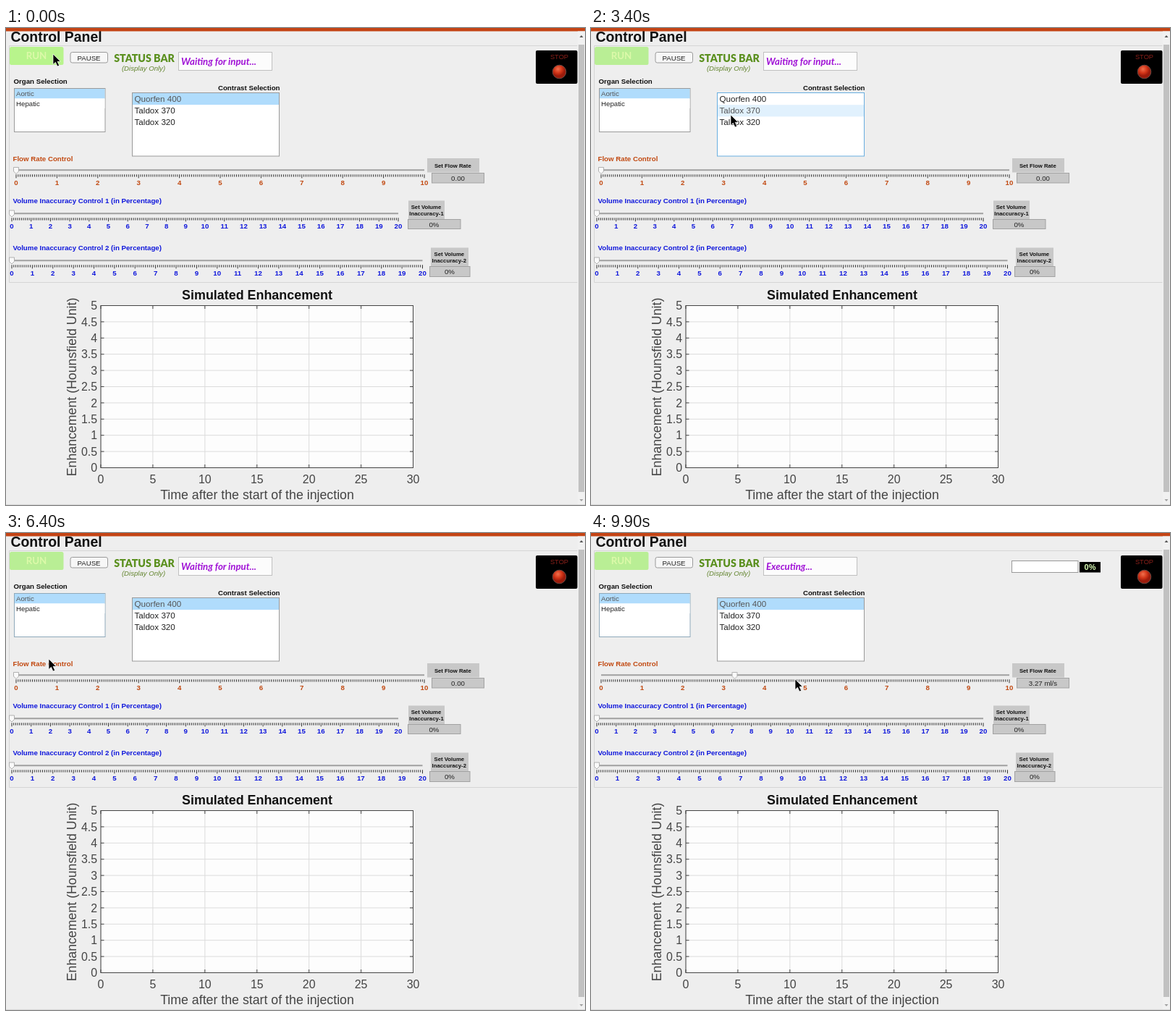
Animation of 800x659 px, one loop 10000 ms. Source, as an HTML page:

```html
<!DOCTYPE html>
<html lang="en">
<head>
<meta charset="utf-8">
<title>Control Panel</title>
<style>
html, body { margin: 0; width: 100%; height: 100%; overflow: hidden; background: #eee; }
svg { display: block; width: 800px; height: 659px; }
text { font: 9.7px "Liberation Sans", Arial, sans-serif; fill: #222; }
.b { font-weight: bold; }
.mid { text-anchor: middle; }
.end { text-anchor: end; }
.hum { font-family: Lato, sans-serif; font-weight: bold; }
.orange { fill: #c24a12; }
.blue { fill: #1018dc; }
.small { font-size: 7.75px; font-weight: bold; fill: #111; }
.row { font-size: 11.65px; }
.axis { font-size: 15.9px; fill: #444; }
.label { font-size: 17.75px; fill: #444; }
.box { fill: #c8c8c8; }
.field { fill: #c8c8c8; stroke: #a2a2a2; }
.list { fill: #fff; stroke: #9a9a9a; }
.thumb { fill: #fafafa; stroke: #a0a0a0; stroke-width: .8; }

.step { animation: 10s step-end infinite; }
#run { animation-name: run; }
#status { animation-name: blink; }
#organs { animation-name: organs; }
#contrasts { animation-name: contrasts; }
#hepatic { animation-name: hepatic; }
#first { animation-name: first; }
#second { animation-name: second; }
#firstText { animation-name: firstText; }
#secondText { animation-name: secondText; }
#hepaticText { animation-name: hepaticText; }
#flow { animation-name: flow; }
.before { animation-name: before; }
.after { animation-name: after; }
.exec { animation-name: exec; }
.wait { animation-name: wait; }
#ghost { animation-name: ghost; }
#cursor { animation: move 10s linear infinite; }

@keyframes run { 0% { fill: #b8f48c; } 4%, 100% { fill: #b9ee95; } }
@keyframes blink {
  0%, 14%, 34%, 54%, 74%, 91% { fill: #fcfcfc; }
  5%, 25%, 45%, 65%, 85% { fill: #a8ffc2; }
}
@keyframes organs { 0% { stroke: #9a9a9a; } 48% { stroke: #68aee0; } 56%, 100% { stroke: #8fa9ba; } }
@keyframes contrasts { 0%, 47%, 100% { stroke: #9a9a9a; } 31% { stroke: #68aee0; } }
@keyframes hepatic { 0%, 55%, 100% { fill: #fff; } 49% { fill: #dff0fd; } }
@keyframes hepaticText { 0%, 55%, 100% { fill: #222; } 49% { fill: #555; } }
@keyframes first { 0%, 43%, 100% { fill: #b0dcfc; } 34% { fill: #fff; } }
@keyframes firstText { 0%, 43%, 100% { fill: #555; } 34% { fill: #222; } }
@keyframes second { 0%, 43%, 100% { fill: #fff; } 33% { fill: #e1f1fd; } 36% { fill: #b0dcfc; } }
@keyframes secondText { 0%, 43%, 100% { fill: #222; } 33% { fill: #555; } }
@keyframes flow { 0% { transform: translate(14px, 196px); } 89%, 100% { transform: translate(198.5px, 196px); } }
@keyframes before { 0% { opacity: 1; } 89%, 100% { opacity: 0; } }
@keyframes after { 0% { opacity: 0; } 89%, 100% { opacity: 1; } }
@keyframes wait { 0% { opacity: 1; } 91%, 100% { opacity: 0; } }
@keyframes exec { 0% { opacity: 0; } 91%, 100% { opacity: 1; } }
@keyframes ghost { 0%, 16%, 100% { opacity: 0; } 15% { opacity: 1; } }
@keyframes move {
  0%, 4% { transform: translate(65px, 36px); }
  13% { transform: translate(70px, 206px); }
  15%, 16% { transform: translate(94px, 238px); }
  20% { transform: translate(120px, 270px); }
  31% { transform: translate(194px, 112px); }
  33.5%, 37% { transform: translate(193px, 120px); }
  41%, 44% { transform: translate(194px, 98px); }
  49% { transform: translate(104px, 103px); }
  51%, 53% { transform: translate(104px, 109px); }
  57% { transform: translate(66px, 164px); }
  64%, 66% { transform: translate(59px, 174px); }
  72% { transform: translate(66px, 196px); }
  83%, 90% { transform: translate(199px, 203px); }
  98%, 100% { transform: translate(282px, 202px); }
}
</style>
</head>
<body>
<svg viewBox="0 0 800 659">
  <defs>
    <radialGradient id="lamp" cx="40%" cy="30%">
      <stop offset="0" stop-color="#f0704e"/>
      <stop offset=".6" stop-color="#d23518"/>
      <stop offset="1" stop-color="#9c1c0c"/>
    </radialGradient>
    <path id="arrow" d="M0 0V14.4L3.4 11.3L6 17L8.6 15.8L6.1 10.3H10.3Z" stroke="#fff" stroke-width=".7"/>
    <path id="knob" d="M-3.5 -3.5H3.5V2L0 5.5L-3.5 2Z"/>
  </defs>

  <rect width="800" height="659" fill="#eee"/>
  <path d="M789.5 24.5H4.5V351.5H789.5" fill="none" stroke="#d5d5d5"/>
  <text class="b" x="6.5" y="18.5" style="font-size:19.4px;fill:#111">Control Panel</text>
  <rect width="800" height="4.5" fill="#c44414"/>

  <g id="scrollbar">
    <rect x="790" y="4.5" width="10" height="654.5" fill="#f1f1f1"/>
    <rect x="791" y="23" width="8" height="618" fill="#c1c1c1"/>
    <path d="M792.5 13L795 10L797.5 13Z" fill="#555"/>
    <path d="M792.5 651L795 654L797.5 651Z" fill="#a0a0a0"/>
    <rect y="658" width="800" height="1" fill="#d8d8d8"/>
  </g>

  <rect id="run" class="step" x="5" y="26" width="74.5" height="25" rx="2.5"/>
  <text class="hum mid" x="42" y="43" style="font-size:13.3px;fill:#dcf9a9">RUN</text>
  <rect x="89" y="33.5" width="51.5" height="14.5" rx="2.5" fill="#f7f7f7" stroke="#9a9a9a"/>
  <text class="mid" x="114.5" y="45">PAUSE</text>
  <text class="hum mid" x="191" y="47" style="font-size:14.2px;font-weight:900;fill:#5b901f">STATUS BAR</text>
  <text class="mid" x="190" y="59" style="font-size:9.6px;font-style:italic;fill:#63852f">(Display Only)</text>
  <rect id="status" class="step" x="238.5" y="33.5" width="129" height="25" stroke="#c0c0c0"/>
  <g style="font-style:italic">
    <text class="hum step wait" x="242" y="51" style="font-size:13.2px;font-style:italic;fill:#a012d6">Waiting for input...</text>
    <text class="hum step exec" x="242" y="51" style="font-size:13.2px;font-style:italic;fill:#a012d6">Executing...</text>
  </g>

  <g class="step exec">
    <rect x="581.5" y="38.5" width="91.5" height="16" fill="#fff" stroke="#999"/>
    <rect x="675" y="40" width="29" height="14.5"/>
    <text class="b mid" x="689.5" y="51" style="font-size:11px;fill:#dcffb8">0%</text>
  </g>
  <rect x="732" y="31" width="57.5" height="46" rx="2"/>
  <text class="mid" x="764.5" y="43" style="font-size:9.3px;fill:#8a201a">STOP</text>
  <circle cx="764.5" cy="60.5" r="9.3" fill="url(#lamp)" stroke="#6d4a44"/>

  <text class="b" x="10.5" y="77" style="fill:#111">Organ Selection</text>
  <rect id="organs" class="list step" x="11.5" y="83.5" width="125.5" height="60"/>
  <rect x="12" y="84" width="124.5" height="13.5" fill="#b0dcfc"/>
  <rect id="hepatic" class="step" x="12" y="97.5" width="124.5" height="13.5"/>
  <text x="14" y="94" style="fill:#555">Aortic</text>
  <text id="hepaticText" class="step" x="14" y="108">Hepatic</text>

  <text class="b end" x="378.5" y="86" style="fill:#111">Contrast Selection</text>
  <rect id="contrasts" class="list step" x="174.5" y="89.5" width="203" height="87.5"/>
  <rect id="first" class="step" x="175" y="90" width="202" height="16.2"/>
  <rect id="second" class="step" x="175" y="106.2" width="202" height="16.2"/>
  <text id="firstText" class="row step" x="177.5" y="102">Quorfen 400</text>
  <text id="secondText" class="row step" x="177.5" y="118">Taldox 370</text>
  <text class="row" x="177.5" y="134.3">Taldox 320</text>

  <text class="b orange" x="9.5" y="184">Flow Rate Control</text>
  <text class="b blue" x="9.5" y="242">Volume Inaccuracy Control 1 (in Percentage)</text>
  <text class="b blue" x="9.5" y="306.7">Volume Inaccuracy Control 2 (in Percentage)</text>
  <g id="sliders"></g>
  <use id="flow" class="thumb step" href="#knob"/>
  <use class="thumb" href="#knob" x="8" y="255.5"/>
  <use class="thumb" href="#knob" x="8" y="320.5"/>

  <rect class="box" x="582" y="180" width="72" height="19.5"/>
  <text class="small mid" x="617.3" y="193">Set Flow Rate</text>
  <rect class="field" x="588.5" y="200.5" width="72" height="13.5"/>
  <text class="mid step before" x="624.5" y="211">0.00</text>
  <text class="mid step after" x="624.5" y="211">3.27 ml/s</text>

  <rect class="box" x="556" y="238.5" width="50" height="26"/>
  <text class="small mid" x="580.5" y="250">Set Volume</text>
  <text class="small mid" x="581" y="259">Inaccuracy-1</text>
  <rect class="field" x="555.5" y="264.5" width="72.5" height="13"/>
  <text class="mid" x="591.5" y="274.7">0%</text>

  <rect class="box" x="587" y="303.5" width="52" height="26"/>
  <text class="small mid" x="612.3" y="315">Set Volume</text>
  <text class="small mid" x="612.3" y="324">Inaccuracy-2</text>
  <rect class="field" x="585.5" y="329.5" width="55.5" height="14"/>
  <text class="mid" x="613" y="340.3">0%</text>

  <text class="b mid" x="347" y="375" style="font-size:17.9px;fill:#111">Simulated Enhancement</text>
  <rect x="131" y="383.5" width="431.5" height="224" fill="#fdfdfd"/>
  <g id="chart"></g>
  <rect x="131" y="383.5" width="431.5" height="224" fill="none" stroke="#444"/>
  <text class="label mid" x="347" y="650.5">Time after the start of the injection</text>
  <text class="label mid" transform="translate(97 496) rotate(-90)">Enhancement (Hounsfield Unit)</text>

  <use id="ghost" class="step" href="#arrow" x="82" y="222"/>
  <use id="cursor" href="#arrow"/>
</svg>
<script>
const byId = id => document.getElementById(id);
const path = (d, color, width = 1) =>
  `<path d="${d}" fill="none" stroke="${color}" stroke-width="${width}"/>`;
const text = (cls, x, y, s) => `<text class="${cls}" x="${x}" y="${y}">${s}</text>`;

// Track, 200 fine ticks and numbered marks
function slider(x0, x1, y, max, color) {
  const span = x1 - x0;
  let ticks = '', labels = '';
  for (let i = 0; i <= 200; i++) {
    const major = i % (200 / max) === 0;
    ticks += `M${x0 + span * i / 200} ${y + 6}v${major ? 5 : 3.3}`;
  }
  for (let n = 0; n <= max; n++) {
    labels += text(`b mid ${color}`, x0 + span * n / max, y + 21, n);
  }
  return path(`M${x0} ${y}H${x1}`, '#a0a0a0', 2) + path(ticks, '#333') + labels;
}
byId('sliders').innerHTML =
  slider(14, 578, 196.3, 10, 'orange') +
  slider(8, 542, 256.3, 20, 'blue') +
  slider(8, 575.5, 321.3, 20, 'blue');

let grid = '', marks = '', numbers = '';
for (let i = 0; i <= 6; i++) {
  const x = 131 + 431.5 * i / 6;
  grid += `M${x} 383.5V607.5`;
  marks += `M${x} 383.5v4.5M${x} 607.5v-4.5`;
  numbers += text('axis mid', x, 628.5, i * 5);
}
for (let i = 0; i <= 10; i++) {
  const y = 607.5 - 22.4 * i;
  grid += `M131 ${y}H562.5`;
  marks += `M131 ${y}h4.5M562.5 ${y}h-4.5`;
  numbers += text('axis end', 126, y + 5.7, i / 2);
}
byId('chart').innerHTML = path(grid, '#dcdcdc') + path(marks, '#444') + numbers;
</script>
</body>
</html>
```
